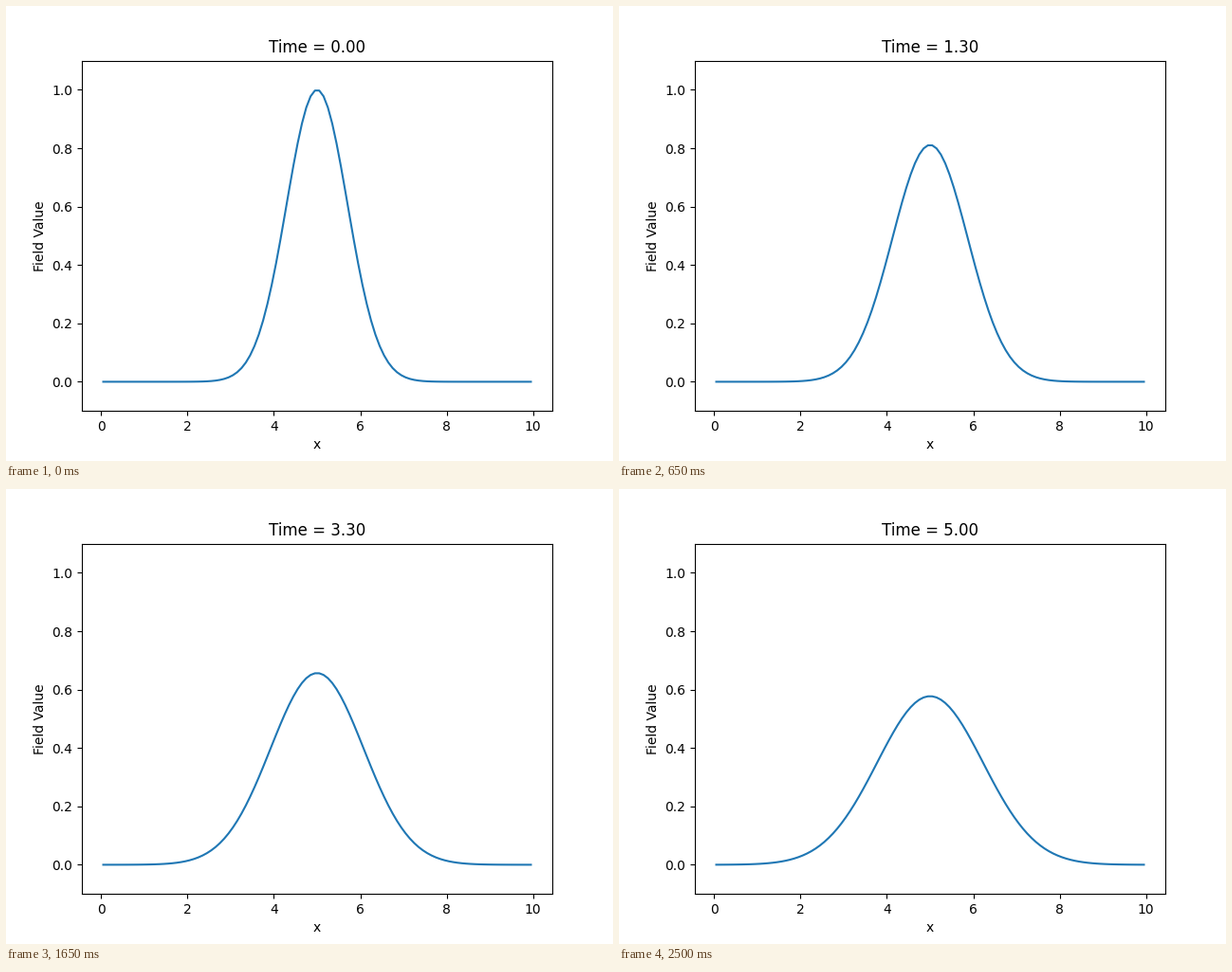
Recreate the animation shown at these times as a matplotlib script. Size 640 px wide and 480 px high, loop 2550 ms.

```python
import matplotlib.pyplot as plt
import numpy as np
from matplotlib.animation import FuncAnimation

FRAMES = 51
INTERVAL = 50  # ms
TIME_STEP = 0.1
DIFFUSIVITY = 0.1
LENGTH = 10
CELLS = 100

plt.rcParams["font.family"] = "DejaVu Sans"

# Cell centres of a uniform grid
x = (np.arange(CELLS) + 0.5) * LENGTH / CELLS


def field(t):
    """Gaussian pulse spreading by diffusion."""
    spread = 1 + 4 * DIFFUSIVITY * t
    return np.exp(-(x - LENGTH / 2) ** 2 / spread) / np.sqrt(spread)


fig, ax = plt.subplots(figsize=(6.4, 4.8), dpi=100)
line, = ax.plot(x, field(0), color="#1f77b4", linewidth=1.5)
ax.set_ylim(-0.1, 1.1)
ax.set_xlabel("x")
ax.set_ylabel("Field Value")
title = ax.set_title("Time = 0.00")


def update(frame):
    t = frame * TIME_STEP
    line.set_ydata(field(t))
    title.set_text(f"Time = {t:.2f}")
    return line, title


anim = FuncAnimation(fig, update, frames=FRAMES, interval=INTERVAL,
                     repeat=True, repeat_delay=0, blit=False)
plt.show()
```
